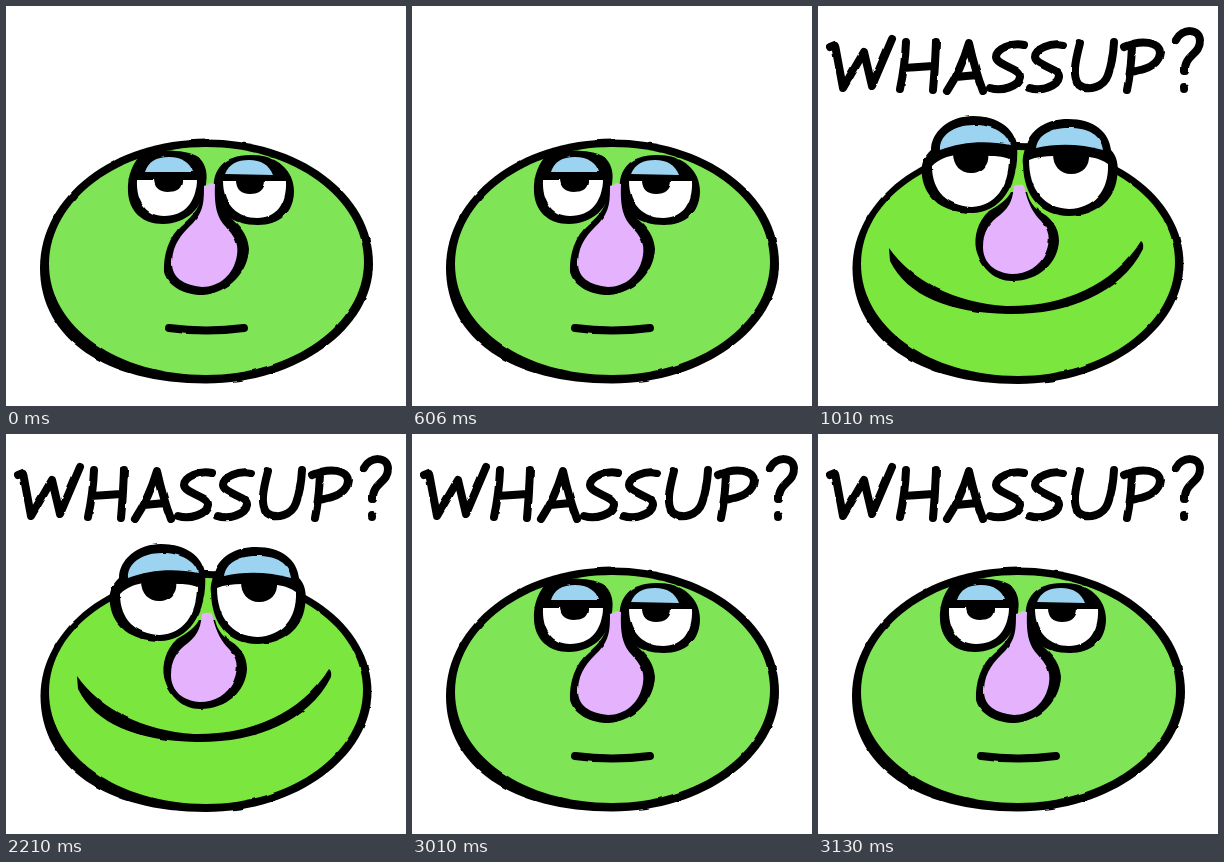
Write an HTML page that moves like this. It is 400 px wide and 400 px high and loops after 3.21 s.

```html
<!DOCTYPE html>
<html lang="en">
<head>
<meta charset="utf-8">
<title>Whassup?</title>
<style>
  html, body { margin: 0; width: 100%; height: 100%; overflow: hidden; background: #fff; }
  svg { display: block; width: 100%; height: 100%; }

  .ink { fill: none; stroke: #000; stroke-linecap: round; stroke-linejoin: round; }
  .white { fill: #fff; }
  .lid { fill: #9bd3f0; }
  .nose { fill: #e5b3fd; }

  /* Hard cuts at 1010 ms and 3010 ms of a 3210 ms loop */
  .bored, .smiling, .greeting { animation: 3210ms step-end infinite; }
  .bored { animation-name: bored; }
  .smiling { animation-name: smiling; }
  .greeting { animation-name: greeting; }
  @keyframes bored {
    0% { visibility: visible; }
    31.4642% { visibility: hidden; }
    93.7695%, 100% { visibility: visible; }
  }
  @keyframes smiling {
    0% { visibility: hidden; }
    31.4642% { visibility: visible; }
    93.7695%, 100% { visibility: hidden; }
  }
  @keyframes greeting {
    0% { visibility: hidden; }
    31.4642%, 100% { visibility: visible; }
  }
</style>
</head>
<body>
<svg viewBox="0 0 400 400" role="img" aria-label="WHASSUP?">
  <defs>
    <!-- Slightly uneven marker edges -->
    <filter id="rough" filterUnits="userSpaceOnUse" x="0" y="0" width="400" height="400" color-interpolation-filters="sRGB">
      <feTurbulence type="fractalNoise" baseFrequency=".07" numOctaves="1" seed="4"/>
      <feDisplacementMap in="SourceGraphic" scale="2.5" xChannelSelector="R" yChannelSelector="G"/>
    </filter>
  </defs>

  <g class="bored" filter="url(#rough)">
    <path d="M34 262C34 190 108 133.5 200 133.5C292 133.5 367 187 367 258C367 322 292 377.5 200 377.5C100 377.5 34 333 34 262Z"/>
    <path fill="#80e556" d="M43 258C43 194 114 141 200 141C287 141 358 192 358 256C358 318 287 369 200 369C112 369 43 322 43 258Z"/>

    <!-- Eyes -->
    <path d="M122 186C121 170 127 156 136 148C152 142 181 144 191 150C199 156 202 166 200 177C198 202 180 218 157 218C136 218 123 205 122 186Z"/>
    <path class="white" d="M131 174H191C190 196 179 210 158 210C140 210 130 196 131 174Z"/>
    <path class="lid" d="M139 166C142 156 150 151 163 151C176 151 184 157 187 166Z"/>
    <path d="M148 173H176C177 182 171 186 162 186C153 186 148 181 148 173Z"/>
    <path d="M208 184C206 164 218 149 244 149C270 148 288 164 288 185C288 207 273 219 252 219C227 219 209 207 208 184Z"/>
    <path class="white" d="M217 175H280C281 198 270 212 251 212C232 212 217 199 217 175Z"/>
    <path class="lid" d="M219 168C223 158 231 154 243 154C255 154 263 159 267 169Z"/>
    <path d="M230 174H259C259 184 253 188 244 188C235 188 230 183 230 174Z"/>

    <!-- Nose -->
    <path d="M197 186C194 200 189 208 176 219C163 230 157 249 158 266C162 281 179 289 197 289C222 287 242 267 243 243C242 226 230 216 218 207C212 200 212 192 211 186Z"/>
    <path class="nose" d="M198 179Q204 176 209 178C208 200 211 211 219 220C228 230 233 237 231 249C228 269 213 281 196 281C178 279 165 272 166 255C167 237 176 228 187 217C198 205 198 195 198 179Z"/>

    <path class="ink" stroke-width="8" d="M163 322Q200 327 238 322"/>
  </g>

  <g class="smiling" filter="url(#rough)">
    <path d="M34.5 262C34.5 194 108 137 200 137C291 137 365.5 190 365.5 258C365.5 322 291 378 200 378C100 378 34.5 333 34.5 262Z"/>
    <path fill="#7be63e" d="M43 258C43 194 114 144 200 144C287 144 357 194 357 256C357 318 287 370 200 370C112 370 43 322 43 258Z"/>

    <!-- Eyes -->
    <path d="M104 170C102 157 107 150 113 144C113 126 131 110 155 110C181 110 196 123 199 139C202 181 181 207 154 207C126 207 107 193 104 170Z"/>
    <path class="white" d="M114 160C121 153 130 150 138 149L174 150C180 150 187 151 191 153C191 181 177 200 154 201C130 200 114 186 114 160Z"/>
    <path class="lid" d="M122 144C121 130 135 119 156 119C175 119 189 127 192 139C168 134 143 136 122 144Z"/>
    <path d="M135 147H170C172 159 164 167 153 167C143 167 135 160 135 147Z"/>
    <path d="M205 159C204 151 206 147 208 139C213 123 229 113 250 113C276 113 291 126 293 144C299 150 301 160 299 172C296 195 278 210 251 210C223 210 206 191 205 159Z"/>
    <path class="white" d="M211 154C218 151 227 150 236 150L271 151C279 152 286 155 290 158C291 185 276 202 251 203C226 202 211 184 211 154Z"/>
    <path class="lid" d="M218 142C220 129 232 122 251 122C271 122 283 129 285 144C263 138 240 137 218 142Z"/>
    <path d="M235 148H271C272 160 265 168 253 168C242 168 235 160 235 148Z"/>

    <!-- Nose -->
    <path d="M193 186C189 194 181 199 171 205C159 216 156 231 158 243C163 263 177 275 194 275C221 275 240 257 241 235C241 220 232 211 221 205C214 199 211 194 209 186Z"/>
    <path class="nose" d="M196 179Q202 176 206 180C210 199 216 208 223 215C231 223 233 234 228 246C222 261 208 268 194 268C177 267 165 257 165 241C165 225 172 216 182 209C193 200 195 191 196 179Z"/>

    <!-- Smile -->
    <path d="M71 242C94 275 137 297 188 300C243 301 294 281 323 235Q326 237 325 243C302 289 247 309 190 308C132 307 89 290 72 255Z"/>
  </g>

  <!-- Hand-drawn lettering -->
  <g class="greeting ink" stroke-width="8" filter="url(#rough)">
    <path d="M12 41L17 39L25 82L46 46L54 80L74 33"/>
    <path d="M88 36Q87 60 82 83M118 36Q117 62 115 84M86 62L115 60"/>
    <path d="M129 85Q143 64 151 37Q157 64 165 85M138 71L159 69"/>
    <path d="M206 39C194 36 178 43 178 51C179 60 203 62 202 71C201 80 184 86 172 82"/>
    <path d="M245 39C233 36 217 43 217 51C218 60 242 62 241 71C240 80 223 86 211 82"/>
    <path d="M262 37C257 56 254 71 261 79C270 86 286 81 290 69Q295 55 296 36"/>
    <path d="M314 40Q313 65 309 84M306 41C324 33 342 36 342 47C341 59 327 64 313 66"/>
    <path d="M358 34C364 22 382 22 382 35C382 49 366 49 367 65M366 82V83"/>
  </g>
</svg>
</body>
</html>
```
